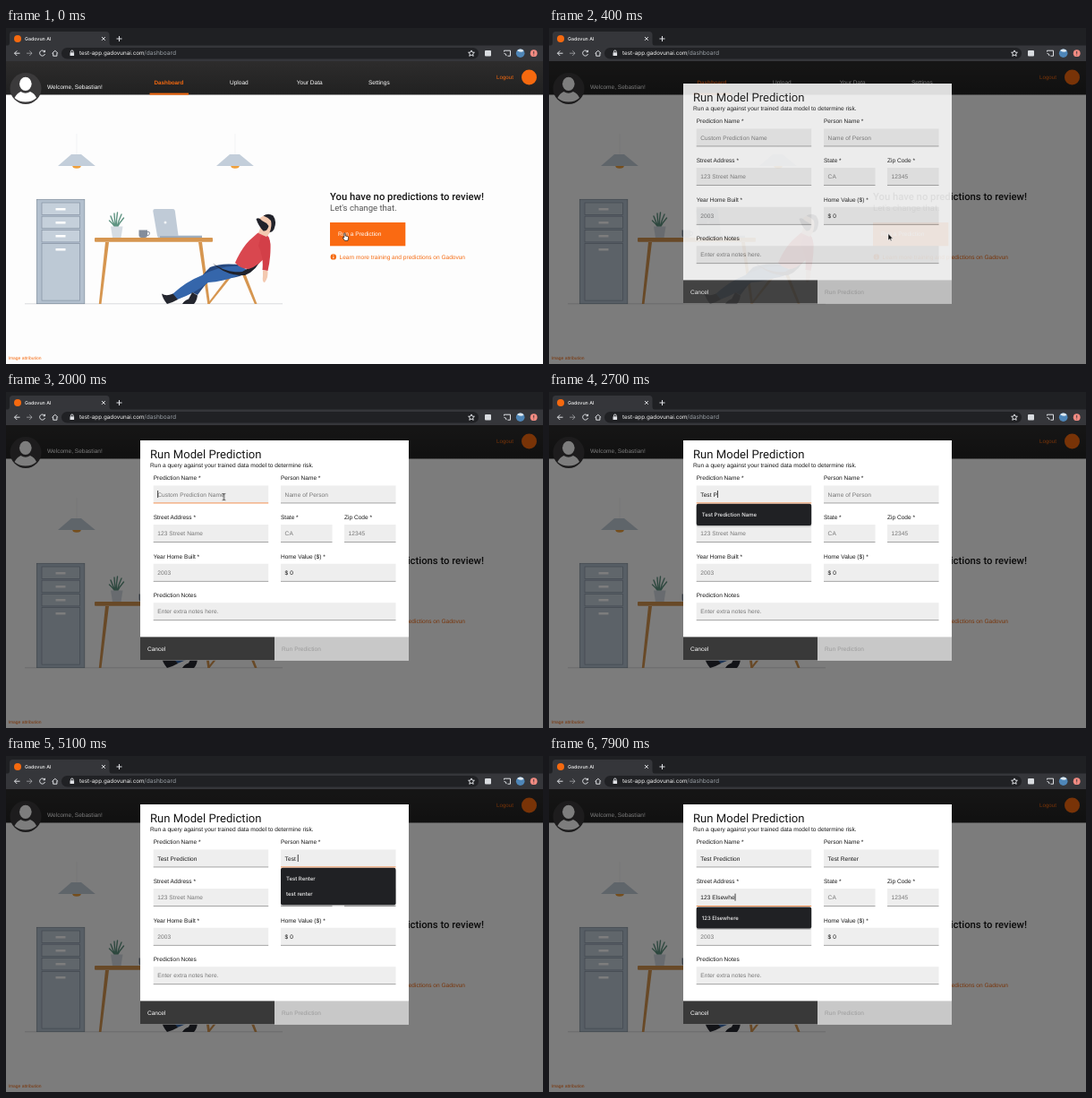
Animation of 600 by 375 pixels, one loop 8 s. Source, as an HTML page:

```html
<!DOCTYPE html>
<html lang="en">
<head>
<meta charset="utf-8">
<title>Dashboard</title>
<style>
html, body { margin: 0; width: 100%; height: 100%; overflow: hidden; background: #fdfdfd; }
svg { display: block; width: 100vw; height: 100vh; }
text { font: 6.56px "Liberation Sans", Arial, sans-serif; white-space: pre; text-rendering: geometricPrecision; }
.ui text { font-family: Inter, Roboto, sans-serif; }
.orange { fill: #f5690f; }
.white { fill: #fff; }
.title { font-family: Roboto, sans-serif; }
.ink { fill: #161616; }
.hint { fill: #757575; letter-spacing: .075px; }
.value { fill: #161616; letter-spacing: .075px; }
.popup text { font: 500 6px Inter, Roboto, sans-serif; fill: #f1f1f1; }
.line { fill: none; stroke: #dfe1e5; stroke-width: 1; }

.shade, .modal, .cursor, .hand, .arrow, .beam { animation: 8s step-end infinite; }
.shade { animation-name: shade; }
.modal { animation-name: modal; }
.cursor { animation-name: travel; }
.hand { animation-name: hand; }
.arrow { animation-name: arrow; }
.beam { animation-name: beam; }
@keyframes shade {
  0% { opacity: 0; }
  2.5% { opacity: .5; }
  3.75%, 100% { opacity: 1; }
}
@keyframes modal {
  0% { opacity: 0; transform: translateY(44px); }
  2.5% { opacity: .12; transform: translateY(42px); }
  3.75% { opacity: .41; transform: translateY(29.5px); }
  5% { opacity: .86; transform: translateY(8px); }
  6.25%, 100% { opacity: 1; transform: none; }
}
@keyframes travel {
  0%, 7.5% { transform: translate(379px, 233px); animation-timing-function: steps(6); }
  15%, 100% { transform: translate(243.5px, 117px); }
}
@keyframes hand { 0% { opacity: 1; } 3.75%, 100% { opacity: 0; } }
@keyframes arrow { 0% { opacity: 0; } 3.75% { opacity: 1; } 13.75%, 100% { opacity: 0; } }
@keyframes beam { 0% { opacity: 0; } 13.75% { opacity: 1; } 26.25%, 100% { opacity: 0; } }
</style>
</head>
<body>
<svg viewBox="0 0 600 375" preserveAspectRatio="none">
  <defs>
    <linearGradient id="bar" x2="0" y2="1">
      <stop offset="0" stop-color="#2d2c2c"/><stop offset="1" stop-color="#212121"/>
    </linearGradient>
    <g id="lamp">
      <path d="M0 118V141" stroke="#eceef0" stroke-width=".6"/>
      <ellipse cy="153.800" rx="4.800" ry="3" fill="#efa03c"/>
      <path d="M-6 141H5L20.800 154H-21Z" fill="#c3ceda"/>
    </g>
  </defs>

  <rect width="600" height="375" fill="#fdfdfd"/>

  <!-- page header -->
  <rect y="37" width="600" height="37.500" fill="url(#bar)"/>
  <circle cx="22" cy="67.500" r="17.500" fill="#3b3a3b"/>
  <ellipse cx="21.800" cy="62.300" rx="6.800" ry="7.600" class="white"/>
  <path d="M9.500 78Q12 73 16.500 71Q21.800 74.500 27 71Q32 73 34 78Q29 82.500 21.800 82.500T9.500 78Z" class="white"/>
  <text x="46" y="68.300" class="white">Welcome, Sebastian!</text>
  <text x="165.500" y="63" class="orange" style="font-size:6.3px;font-weight:700">Dashboard</text>
  <rect x="160.500" y="72.600" width="43.500" height="2" class="orange"/>
  <text x="250" y="63" class="white">Upload</text>
  <text x="324.800" y="63" class="white">Your Data</text>
  <text x="405" y="63" class="white">Settings</text>
  <text x="548" y="57.300" class="orange" style="font-size:6.2px">Logout</text>
  <circle cx="584.500" cy="55" r="8.500" class="orange"/>

  <!-- office scene -->
  <use href="#lamp" x="79"/>
  <use href="#lamp" x="256"/>
  <path d="M21 307.800H309" stroke="#c9cbd0" stroke-width=".7"/>
  <rect x="34.300" y="191.300" width="53.500" height="116.400" fill="#b3c0ce" stroke="#7d8a9a" stroke-width=".7"/>
  <g fill="#c5d0db" stroke="#8491a2" stroke-width=".7">
    <rect x="40" y="195" width="42.500" height="13.500"/>
    <rect x="40" y="210.200" width="42.500" height="13.500"/>
    <rect x="40" y="225.400" width="42.500" height="13.500"/>
    <rect x="40" y="240.600" width="42.500" height="63.500" fill="#bdc9d5"/>
  </g>
  <path d="M55.500 202.200h11M55.500 217.200h11M55.500 232.200h11M55.500 247.200h11" stroke="#fff" stroke-width="2.400"/>

  <g fill="none" stroke="#5f9482" stroke-width="1.400" stroke-linecap="round">
    <path d="M123 223Q119 216 117 210M123 223Q121 214 121 207M123.500 223Q123 214 124.500 206M124 223Q126 214 129 208M124 223Q127 217 131.500 212M122.500 223Q119 218 115.500 215"/>
  </g>
  <path d="M117 221.500H130.500L128.500 234H119Z" fill="#d5dce3"/>
  <path d="M148.500 225.500H158V231Q158 234 155 234H151.500Q148.500 234 148.500 231Z" fill="#838d9b"/>
  <path d="M158 227.500q3-.5 2.500 2t-3 2" fill="none" stroke="#838d9b"/>
  <path d="M166 202H186.500Q188.500 202 188.800 204L192.500 231.500H219V234.500H172Q169.500 234.500 169 232L164.300 204.500Q164 202 166 202Z" fill="#c0cbd7"/>
  <path d="M172 232.300H219V234.500H172Z" fill="#9aa7b6"/>
  <circle cx="178" cy="217" r="1.500" fill="#f1f4f6"/>
  <g fill="#d69650">
    <path d="M111 239H115L106.500 308H103.800ZM215 239H219L228 308H225.300Z"/>
    <rect x="99" y="234" width="132" height="4.800" rx="1"/>
    <path d="M254 270H258L227.500 308H225ZM261 268H265L280.500 308H277.800Z"/>
  </g>

  <path d="M259 264Q240 262 228 267Q217 277 208 295L214 298Q224 284 232 277Q252 282 266 275Z" fill="#27497f"/>
  <path d="M264 266Q240 264 219 276Q201 283 186 297L191.500 303Q211 296 226 284Q252 282 270 271Z" fill="#3566ab"/>
  <path d="M186.500 296.500L192 303Q187 306 180 308Q175 302 174 296.500Q179 300 186.500 296.500ZM208 295L214 298.500Q213 305 210 308H197Q199 304 204 302.500Z" fill="#24262f"/>
  <path d="M231 262.500Q246 274 264 272Q278 266 287 241L290.500 241Q285 269 267 276Q246 277 231 262.500Z" fill="#20222b"/>
  <path d="M281 229Q288 225 294 234Q296 243 292 252Q284 265 271 269Q262 269 256 262Q263 246 272 237Z" fill="#d9474f"/>
  <path d="M285 232Q295 231 295.500 241Q296 256 292.500 271L286.500 270Q288 255 282 243Z" fill="#d33f48"/>
  <path d="M287 270.500L292.300 271Q293.500 278 289 284Q286 284 287 277Z" fill="#f3c9b0"/>
  <!-- head thrown back: skin, beard, hair -->
  <path d="M282 214Q288 207 297 210Q302 217 297 226L291 233L282 229L285 221Z" fill="#f3c9b0"/>
  <path d="M279.500 213Q283 211 286 215Q291 217 293.500 221Q292 227 287.500 226.500Q282 221 279.500 213Z" fill="#21222a"/>
  <path d="M287.500 209.500Q293 206 298.500 209.500Q303 216 299.500 224.500Q297.500 228 294.500 228Q297.500 221 296 215Q292 211 287.500 209.500Z" fill="#21222a"/>

  <!-- call to action -->
  <text x="362" y="191.600" class="title ink" style="font-size:11.28px;font-weight:500">You have no predictions to review!</text>
  <text x="362" y="203.600" class="title" fill="#565656" style="font-size:9.55px">Let's change that.</text>
  <rect x="362" y="217" width="84.300" height="26.300" fill="#fa6a12"/>
  <text x="371" y="232.400" class="white">Run a Prediction</text>
  <circle cx="365.800" cy="255.400" r="3.200" class="orange"/>
  <path d="M365.800 253.300v.9M365.800 255v2.300" stroke="#fff" stroke-width=".9"/>
  <text x="372.500" y="257.700" class="orange">Learn more training and predictions on Gadovun</text>
  <text x="2.500" y="370.200" class="orange" style="font-size:4.96px">Image attribution</text>

  <rect class="shade" y="37" width="600" height="338" fill="#000" fill-opacity=".51"/>

  <!-- browser frame -->
  <g class="ui">
    <rect width="600" height="20" fill="#1f2023"/>
    <path d="M1 20Q4 20 4 16V7.500Q4 4 7.500 4H112Q115.500 4 115.500 7.500V16Q115.500 20 118.500 20Z" fill="#35363a"/>
    <rect y="19.500" width="600" height="17.500" fill="#35363a"/>
    <rect x="62" y="22" width="466" height="12.500" rx="6.250" fill="#202124"/>
    <circle cx="13" cy="12" r="4" class="orange"/>
    <text x="21" y="14" fill="#f4f4f4" style="font-size:5.3px;font-weight:500">Gadovun AI</text>
    <path class="line" d="M107 10l3.800 3.800m0-3.800l-3.800 3.800M123.500 12h6M126.500 9v6"/>
    <path class="line" d="M15.500 28.200H9.500m2.800-2.800l-2.800 2.800l2.800 2.800"/>
    <path class="line" stroke-opacity=".5" d="M23 28.200h6m-2.800-2.800l2.800 2.800l-2.800 2.800"/>
    <path class="line" d="M43 26.200A3 3 0 1 0 43.500 29M43.500 24.800v2h-2"/>
    <path class="line" d="M51.500 28.300l3.300-3l3.300 3M52.700 28v3.200h4.200v-3.200"/>
    <rect x="71.500" y="27.300" width="4.600" height="3.700" rx=".5" fill="#dfe1e5"/>
    <path class="line" stroke-width=".8" d="M72.500 27.300v-1a1.300 1.300 0 0 1 2.600 0v1"/>
    <text x="82" y="30.400" fill="#f4f4f4" style="font-size:6.3px">test-app.gadovunai.com</text>
    <text x="154.300" y="30.400" fill="#9aa0a6" style="font-size:6.6px">/dashboard</text>
    <path class="line" stroke-width=".7" d="M520 24.900l1 2.200l2.400.2l-1.800 1.600l.6 2.400l-2.200-1.300l-2.200 1.300l.6-2.400l-1.800-1.600l2.400-.2Z"/>
    <rect x="535" y="25" width="7" height="6.500" rx="1" fill="#d9dce0"/>
    <path class="line" d="M556.500 26.500v-1.300h7v6h-3M556.500 28.400a2.700 2.700 0 0 1 2.600 2.700"/>
    <circle cx="574.700" cy="28.200" r="4.800" fill="#4e86b8"/>
    <path d="M571 25.200a4.800 4.800 0 0 1 7.500 0q-2 3-7.500 0Z" fill="#dfe9f0"/>
    <circle cx="589.700" cy="28.200" r="3.900" fill="#f28b82"/>
    <path d="M589.700 26v2.800M589.700 29.700v.8" stroke="#35363a" stroke-width=".9"/>
  </g>

  <g class="modal">
    <rect x="150" y="54" width="300" height="245.500" fill="#fff"/>
    <text x="161" y="74" class="title ink" style="font-size:13.1px">Run Model Prediction</text>
    <text x="161" y="83.600" class="ink" style="font-size:6.6px">Run a query against your trained data model to determine risk.</text>
    <rect x="150" y="273.400" width="150" height="26.100" fill="#393939"/>
    <rect x="300" y="273.400" width="150" height="26.100" fill="#c8c8c8"/>
    <text x="158" y="289" class="white">Cancel</text>
    <text x="308" y="289" fill="#9b9b9b" letter-spacing=".075">Run Prediction</text>
    <g id="form"></g>
    <rect id="caret" width=".8" height="8" class="ink"/>
    <g id="popup" class="popup">
      <rect y="1.500" width="128.500" rx="2" fill="#000" opacity=".18"/>
      <rect width="128.500" rx="2" fill="#202124"/>
      <text x="6" y="14.200"></text>
      <text x="6" y="31.200"></text>
    </g>
  </g>

  <g class="cursor">
    <path class="hand" d="M-1.200 -3.900q.9-.7 1.400.3v2.600l2.600.6q1 .4.9 1.500l-.7 3.200h-3.600l-2.300-3.400q.4-1 1.700.1Z" fill="#fff" stroke="#111" stroke-width=".7"/>
    <path class="arrow" d="M0 -3.500V4L1.800 2.400L3 4.800L4.100 4.200L2.900 1.900H5.200Z" fill="#111" stroke="#fff" stroke-width=".5"/>
    <path class="beam" d="M-1.600 -3.600Q0 -3.600 0 -2.600Q0 -3.600 1.600 -3.600M0 -2.600V2.800M-1.600 3.800Q0 3.800 0 2.800Q0 3.800 1.600 3.800" fill="none" stroke="#111" stroke-width=".8"/>
  </g>
</svg>
<script>
const LOOP = 8000;
const form = document.getElementById("form");
const caret = document.getElementById("caret");
const popup = document.getElementById("popup");
const boxes = popup.querySelectorAll("rect");
const items = popup.querySelectorAll("text");

function add(tag, attrs, text = "") {
  const el = document.createElementNS("http://www.w3.org/2000/svg", tag);
  for (const key in attrs) el.setAttribute(key, attrs[key]);
  el.textContent = text;
  return form.appendChild(el);
}

function field(x, y, width, label, hint, kind = "hint") {
  add("text", { x, y: y - 6, class: "ink" }, label);
  add("rect", { x, y, width, height: 19.8, fill: "#eeeeee" });
  const line = add("rect", { x, y: y + 19.2, width, height: 0.7, fill: "#858585" });
  const text = add("text", { x: x + 4.6, y: y + 12.1, class: kind }, hint);
  return { x, y, hint, line, text };
}

const name = field(164.7, 104.4, 128.5, "Prediction Name *", "Custom Prediction Name");
const person = field(307, 104.4, 128.5, "Person Name *", "Name of Person");
const street = field(164.7, 148, 128.5, "Street Address *", "123 Street Name");
field(307, 148, 57.5, "State *", "CA");
field(378, 148, 57.5, "Zip Code *", "12345");
field(164.7, 191.7, 128.5, "Year Home Built *", "2003");
field(307, 191.7, 128.5, "Home Value ($) *", "$ 0", "value");
field(164.7, 235.2, 270.8, "Prediction Notes", "Enter extra notes here.");

// keys: moment of each keystroke in ms, focus: [gained, lost], list: suggestions
const entries = [
  { ...name, value: "Test Prediction", focus: [1500, 4200], list: ["Test Prediction Name"],
    keys: [2100, 2300, 2400, 2500, 2600, 2700, 2900, 3100, 3300, 3400, 3500, 3600, 3700, 3800, 3900] },
  { ...person, value: "Test Renter", focus: [4200, 6100], list: ["Test Renter", "test renter"],
    keys: [4500, 4600, 4800, 4900, 5000, 5300, 5400, 5500, 5600, 5700, 5900] },
  { ...street, value: "123 Elsewhere", focus: [6100, LOOP], list: ["123 Elsewhere", "123 Demo"],
    keys: [6400, 6500, 6700, 6900, 7000, 7100, 7300, 7500, 7700, 7800, 7900] }
];

function showPopup(entry, typed) {
  const hits = typed ? entry.list.filter(s => s.toLowerCase().startsWith(typed.toLowerCase())) : [];
  popup.style.display = hits.length ? "" : "none";
  popup.setAttribute("transform", `translate(${entry.x} ${entry.y + 20.4})`);
  boxes.forEach(box => box.setAttribute("height", 7 + 17.2 * hits.length));
  items.forEach((item, i) => item.textContent = hits[i] || "");
}

function render(now) {
  const t = now % LOOP;
  caret.style.display = popup.style.display = "none";
  for (const entry of entries) {
    const { x, y, text, line, focus, keys } = entry;
    const typed = entry.value.slice(0, keys.filter(k => k <= t).length);
    const active = t >= focus[0] && t < focus[1];
    text.textContent = typed || entry.hint;
    text.setAttribute("class", typed ? "value" : "hint");
    line.setAttribute("fill", active ? "#f5690f" : "#858585");
    if (!active) continue;
    caret.style.display = "";
    caret.setAttribute("x", x + 4.6 + (typed ? text.getComputedTextLength() : 0));
    caret.setAttribute("y", y + 5.6);
    showPopup(entry, typed);
  }
  requestAnimationFrame(render);
}
requestAnimationFrame(render);
</script>
</body>
</html>
```
